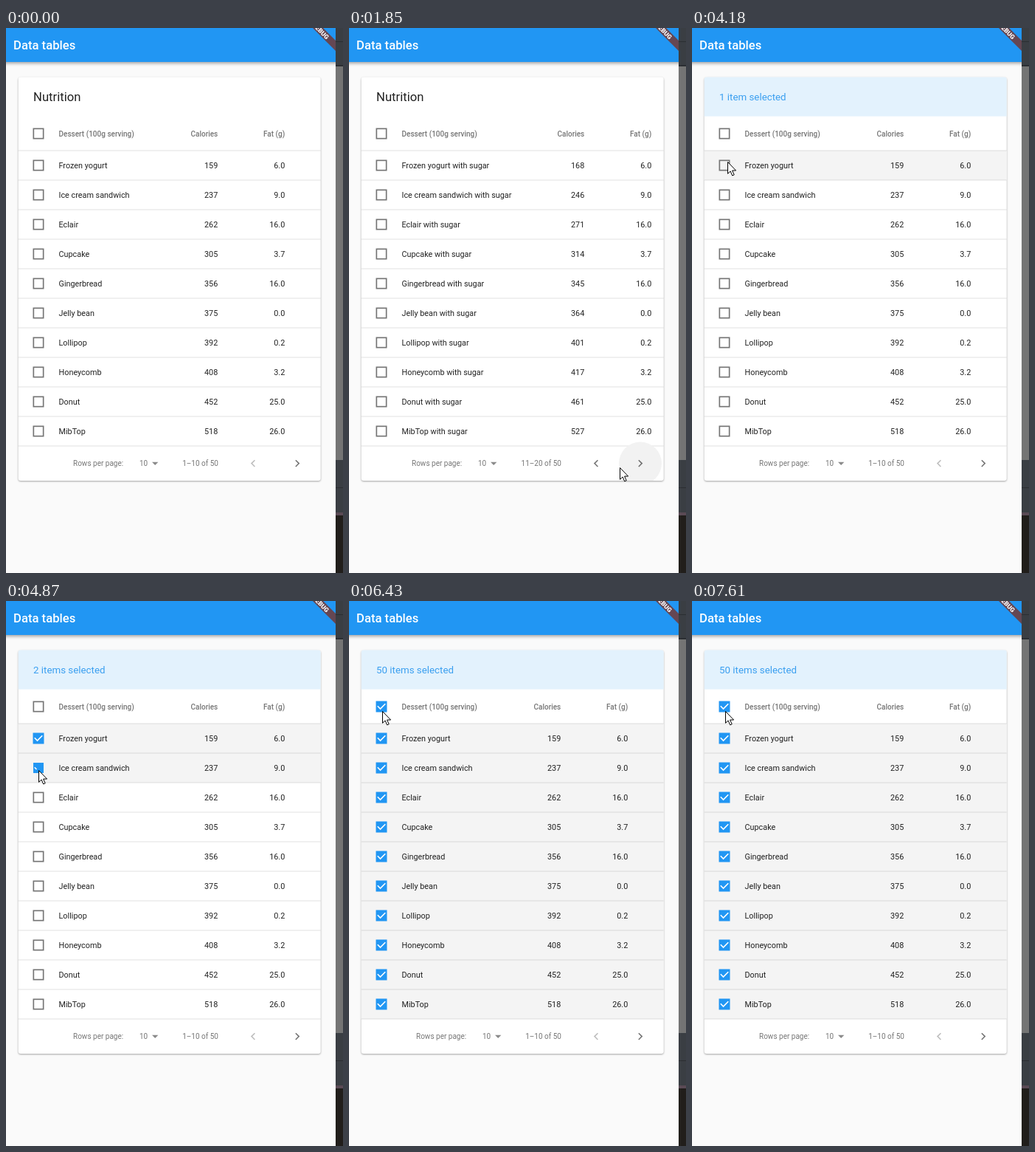
Recreate the animation shown at these times as an HTML page. Size 457 by 738 pixels, loop 7.99 s.

```html
<!DOCTYPE html>
<html lang="en">
<head>
<meta charset="utf-8">
<title>Data tables</title>
<style>
  html, body { margin: 0; width: 100%; height: 100%; overflow: hidden; background: #fafafa; }
  svg { display: block; width: 457px; height: 738px; font: 10.83px Roboto, sans-serif; fill: #000; }
  text { white-space: pre; }
  .cell { fill: rgba(0, 0, 0, .87); }
  .head { font-size: 10px; font-weight: 500; fill: rgba(0, 0, 0, .54); }
  .foot { font-size: 10px; fill: rgba(0, 0, 0, .54); }
  .num { text-anchor: end; }
  .line { fill: rgba(0, 0, 0, .12); }
  .chevron { fill: none; stroke: #000; stroke-width: 1.6; }
  .tick { fill: none; stroke: #fff; stroke-width: 1.67; }
  .bar { filter: drop-shadow(0 2px 2px rgba(0, 0, 0, .35)); }
  .card { filter: drop-shadow(0 1px 1px rgba(0, 0, 0, .35)); }
</style>
</head>
<body>
<svg viewBox="0 0 457 738">
  <defs>
    <clipPath id="cardClip"><rect x="16.7" y="66.4" width="410" height="546.6" rx="3.3"/></clipPath>
    <clipPath id="appClip"><rect width="447" height="738"/></clipPath>
  </defs>

  <g clip-path="url(#appClip)">
    <rect width="447" height="738" fill="#fafafa"/>
    <rect class="bar" x="-10" y="-10" width="467" height="56" fill="#2196f3"/>
    <text x="10" y="29.2" font-size="16.67" font-weight="500" fill="#fff">Data tables</text>
    <g transform="translate(447 -16) rotate(45)">
      <rect x="-40" y="23.3" width="80" height="10" fill="#654753"/>
      <text x="0" y="31.4" font-size="8.5" font-weight="900" fill="#fff" text-anchor="middle">DEBUG</text>
    </g>
  </g>

  <rect class="card" x="16.7" y="66.4" width="410" height="546.6" rx="3.3" fill="#fff"/>
  <g clip-path="url(#cardClip)">
    <rect id="banner" x="16" y="66" width="411" height="53.6" fill="#e3f2fd"/>
    <text id="title" x="37"></text>
    <g id="table"></g>
    <circle id="nextInk" cx="395" cy="589.5" r="29" fill="#f2f2f2"/>
    <circle id="prevInk" cx="335" cy="589.5" r="29" fill="#f2f2f2"/>
    <g id="rowsPer">
      <text class="foot" x="91" y="593.2">Rows per page:</text>
      <text class="foot" x="181" y="593.2">10</text>
      <path d="M198 587.7h8.4l-4.2 4.2z" fill="#8a8a8a"/>
    </g>
    <text id="range" class="foot num" x="288" y="593.2"></text>
    <path id="prev" class="chevron" d="M337.4 585.2l-4.4 4.4 4.4 4.4"/>
    <path class="chevron" d="M392.8 585.2l4.4 4.4-4.4 4.4" stroke-opacity=".54"/>
  </g>

  <g id="strip">
    <rect x="447" width="10" height="738" fill="#3a3e43"/>
    <rect x="447" y="18" width="10" height="1" fill="#2b2e32"/>
    <rect x="447" y="50" width="10" height="2" fill="#2b2e32"/>
    <rect x="447" y="52" width="10" height="533" fill="#747474"/>
    <rect x="447" y="622" width="10" height="1" fill="#2b2e32"/>
    <rect x="447" y="656" width="10" height="4" fill="#5a4a55"/>
    <rect x="447" y="660" width="10" height="78" fill="#211e1b"/>
  </g>

  <path id="cursor" d="M.5.5v15.8l3.6-3.4 2.6 6 2.5-1.1-2.6-5.8h5z" fill="#fff" stroke="#000"/>
</svg>

<script>
const LOOP = 7990, STEP = 77;
const PAGE_ON = 1700, PAGE_OFF = 2630;
const ALL = [5800, 6750, 7380];

// name, calories, calories with sugar, fat
const desserts = [
  ['Frozen yogurt', 159, 168, '6.0'],
  ['Ice cream sandwich', 237, 246, '9.0'],
  ['Eclair', 262, 271, '16.0'],
  ['Cupcake', 305, 314, '3.7'],
  ['Gingerbread', 356, 345, '16.0'],
  ['Jelly bean', 375, 364, '0.0'],
  ['Lollipop', 392, 401, '0.2'],
  ['Honeycomb', 408, 417, '3.2'],
  ['Donut', 452, 461, '25.0'],
  ['MibTop', 518, 527, '26.0']
];

const titles = [[0, 0], [4180, 1], [4710, 2], [5260, 1], [5800, 50], [6750, 0], [7380, 50]];

// start, end, number of steps, way points
const moves = [
  [70, 300, 4, [258, 487]],
  [450, 1220, 11, [255, 430], [290, 520], [345, 612], [398, 597]],
  [1300, 1300, 1, [408, 589]],
  [1450, 1530, 2, [398, 590]],
  [1700, 2310, 9, [367, 595], [348, 599], [334, 588]],
  [2630, 3400, 11, [334, 588], [260, 470], [120, 250], [41, 141], [40, 142]],
  [3470, 3550, 2, [52, 154]],
  [3780, 4010, 4, [48, 181]],
  [4180, 4560, 6, [48, 181], [44, 232], [44, 229]],
  [4710, 5110, 6, [44, 229], [44, 229], [43, 205], [42, 183]],
  [5260, 5650, 6, [42, 183], [46, 160], [50, 140]],
  [5800, 6190, 6, [50, 140], [50, 155], [45, 163]],
  [6360, 6430, 2, [45, 149]]
];

const $ = id => document.getElementById(id);
const clamp = v => Math.max(0, Math.min(1, v));
const mix = (a, b, u) => a + (b - a) * u;
const set = (el, attrs) => { for (const k in attrs) el.setAttribute(k, attrs[k]); };

const checkbox = y => `<g class="check" transform="translate(44 ${y})">
  <rect/><path class="tick" d="M-5.25-.75L-1.5 3 5.25-3.75"/></g>`;
const rowMarkup = y => `<rect class="fill" x="16" y="${y - 20}" width="411" height="40" fill="#f4f4f4"/>
  <rect class="line" x="16" y="${y - 20.5}" width="411" height="1"/>${checkbox(y)}
  <text class="cell name" x="71.5" y="${y + 4}"></text>
  <text class="cell num cal" y="${y + 4}"></text><text class="cell num fat" y="${y + 4}"></text>`;

$('table').innerHTML = `<g>${checkbox(143)}
  <text class="head" x="71.5" y="146.6">Dessert (100g serving)</text>
  <text class="head num cal" y="146.6">Calories</text>
  <text class="head num fat" y="146.6">Fat (g)</text></g>` +
  desserts.map((_, i) => `<g>${rowMarkup(186 + i * 40)}</g>`).join('') +
  '<rect class="line" x="16" y="565.5" width="411" height="1"/>';

const lines = [...$('table').querySelectorAll(':scope > g')].map((g, i) => {
  const find = s => g.querySelector(s);
  return {
    data: desserts[i - 1],
    toggles: i === 1 ? [4180, 5260, ...ALL] : i === 2 ? [4710, 6750, 7380] : ALL,
    box: find('.check rect'), tick: find('.tick'), fill: find('.fill'),
    name: find('.name'), cal: find('.cal'), fat: find('.fat')
  };
});

function drawCheck(line, t) {
  const past = line.toggles.filter(time => time <= t);
  const on = past.length % 2 === 1;
  const since = past.length ? t - past[past.length - 1] : LOOP;
  const run = clamp(Math.floor((since + 8) / STEP) * 0.4);
  const p = past.length === 0 ? 0 : on ? run ** 1.7 : 1 - run ** 1.7;

  // the border thickens until the box is full, then the tick is drawn
  const size = 15 - (1 - Math.abs(p - 0.5) * 2) * 1.67;
  const w = Math.min(size / 2, 1.67 + size * p);
  const c = clamp(p * 4);
  const inner = size - w;
  set(line.box, {
    x: -inner / 2, y: -inner / 2, width: inner, height: inner, fill: 'none', 'stroke-width': w,
    stroke: `rgb(${mix(117, 33, c)}, ${mix(117, 150, c)}, ${mix(117, 243, c)})`
  });
  const q = clamp(p * 2 - 1);
  const drawn = q < 0.5 ? q * 2 * 5.3 : mix(5.3, 14.9, q * 2 - 1);
  set(line.tick, { 'stroke-dasharray': `${drawn} 30`, opacity: q > 0 ? 1 : 0 });
  if (line.fill) set(line.fill, { opacity: on ? 1 : 0 });
}

function drawTable(t) {
  const second = t >= PAGE_ON && t < PAGE_OFF;
  const shift = second ? 32 : 0;
  for (const line of lines) {
    drawCheck(line, t);
    set(line.cal, { x: 287.3 + shift });
    set(line.fat, { x: 378.3 + shift });
    if (!line.data) continue;
    const [name, plain, sugar, fat] = line.data;
    line.name.textContent = second ? name + ' with sugar' : name;
    line.cal.textContent = second ? sugar : plain;
    line.fat.textContent = fat;
  }
  $('range').textContent = second ? '11–20 of 50' : '1–10 of 50';
  set($('rowsPer'), { transform: `translate(${second ? -6 : 0} 0)` });
  set($('prev'), { 'stroke-opacity': second ? 0.54 : 0.26 });
}

function drawTitle(t) {
  const count = titles.filter(([time]) => time <= t).pop()[1];
  $('title').textContent = count ? `${count} item${count > 1 ? 's' : ''} selected` : 'Nutrition';
  set($('title'), count
    ? { y: 97.7, 'font-size': 13.33, fill: '#3a9ff0' }
    : { y: 99.2, 'font-size': 16.67, fill: 'rgba(0,0,0,.87)' });
  set($('banner'), { opacity: count ? 1 : 0 });
}

function cursorAt(t) {
  let pos = [378, 791];
  for (const [start, end, steps, ...points] of moves) {
    if (t < start) break;
    const k = Math.floor((t - start) / (end - start || 1) * (steps - 1) + 0.1);
    const u = clamp((k + 1) / steps) * points.length;
    const path = [pos, ...points];
    const i = Math.min(Math.floor(u), points.length - 1);
    pos = [0, 1].map(a => mix(path[i][a], path[i + 1][a], u - i));
  }
  return pos;
}

const ink = (t, start) => clamp((t - start + 80) / 150) * clamp((start + 350 - t) / 150);

function draw(t) {
  drawTable(t);
  drawTitle(t);
  set($('nextInk'), { opacity: ink(t, PAGE_ON) });
  set($('prevInk'), { opacity: ink(t, PAGE_OFF) });
  set($('cursor'), { transform: `translate(${cursorAt(t).map(Math.round).join(' ')})` });
}

const begin = performance.now();
function tick() {
  draw((performance.now() - begin) % LOOP);
  requestAnimationFrame(tick);
}
tick();
</script>
</body>
</html>
```
